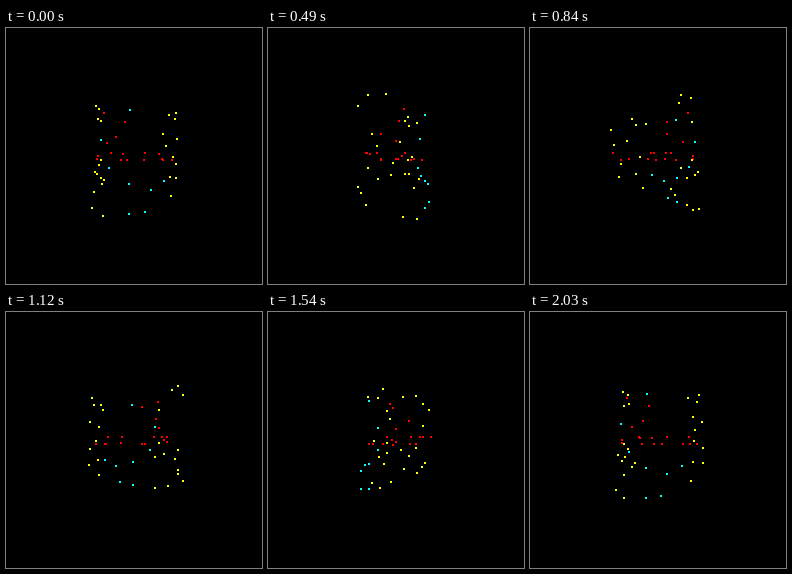
A matplotlib script for the animation above (2100 ms loop, 256 px wide and 256 px high).

```python
import numpy as np
import matplotlib.pyplot as plt
from matplotlib.animation import FuncAnimation

SIZE, DPI = 256, 100
FRAMES, INTERVAL = 30, 70
CENTER, CAMERA = 128, 220
DOT = 2 * 72 / DPI  # two pixels, in points

# x, height (down), depth (towards the viewer)
YELLOW = [
    (-38.7, -51, -4.2), (-38.1, -50.8, -19.5), (-40.5, -41.6, -27.4),
    (-31, -33, 13.5), (31.7, -37.1, 20.8), (40.8, -41.7, 6.4),
    (38.9, -35.1, 11.3), (33.2, -25.2, -31.6), (43, -17, 0.3),
    (35.8, -11.2, -26.2), (36.4, 1, 14.8), (43.6, 8.2, -8.2),
    (-31, 3.8, 13.5), (-38.1, 9.8, -19.5), (-36.4, 14.9, 14.5),
    (-38.8, 18.9, -10.9), (-29.6, 19.5, 22.9), (-34, 26.7, -29.2),
    (-35.8, 31.3, -26.1), (-43.6, 39.4, -19.9), (-40.1, 49.7, 9.9),
    (-28, 54, 21.1), (34.9, 20.4, 6.7), (44, 23, -10.7),
    (34.1, 36.9, 17.1),
]
CYAN = [
    (-3.5, -40, 28.7), (-29.4, -14.3, 23.7), (-22.5, 10.8, 22),
    (-4.4, 24.4, 28.6), (14.5, 29, 32.2), (26.6, 22.2, 25),
    (-4.4, 50.5, 28.6), (9.4, 47.6, 33.1),
]
RED = [
    (-28.6, -41, 10), (-8.8, -33.4, 3.8), (-19, -20, -11.9),
    (-26.7, -12.8, 2.8), (-34.6, 0.4, 8.3), (-36.4, 2.6, 3.8),
]
# two flat layers: (x, depth)
UPPER = [(28.7, -33), (10.6, 8), (-12.3, -27), (-25.5, -24), (-24.3, -14.3)]
LOWER = [(30.6, -20.5), (38, -1.5), (26.6, 17.8), (8.9, 25.6),
         (-12.1, 15.6), (-7.4, -13.8)]
RED += [(x, -2.8, z) for x, z in UPPER] + [(x, 3.8, z) for x, z in LOWER]


def project(points, angle):
    """Turn the cloud about the vertical axis and apply perspective."""
    x, y, z = points.T
    c, s = np.cos(angle), np.sin(angle)
    scale = CAMERA / (CAMERA - (z * c - x * s))
    return CENTER + np.column_stack(((x * c + z * s) * scale, y * scale))


fig = plt.figure(figsize=(SIZE / DPI, SIZE / DPI), dpi=DPI, facecolor="black")
ax = fig.add_axes([0, 0, 1, 1])
ax.set(xlim=(0, SIZE), ylim=(SIZE, 0))
ax.axis("off")

clouds = []
for color, points in (("#ff0000", RED), ("#ffff00", YELLOW), ("#00ffff", CYAN)):
    dots = ax.scatter([], [], s=DOT**2, c=color, marker="s", linewidths=0)
    clouds.append((dots, np.array(points, dtype=float)))


def update(frame):
    angle = 2 * np.pi * frame / FRAMES
    for dots, points in clouds:
        dots.set_offsets(project(points, angle))
    return [dots for dots, _ in clouds]


anim = FuncAnimation(fig, update, frames=FRAMES, interval=INTERVAL,
                     repeat=True, repeat_delay=0)
plt.show()
```
